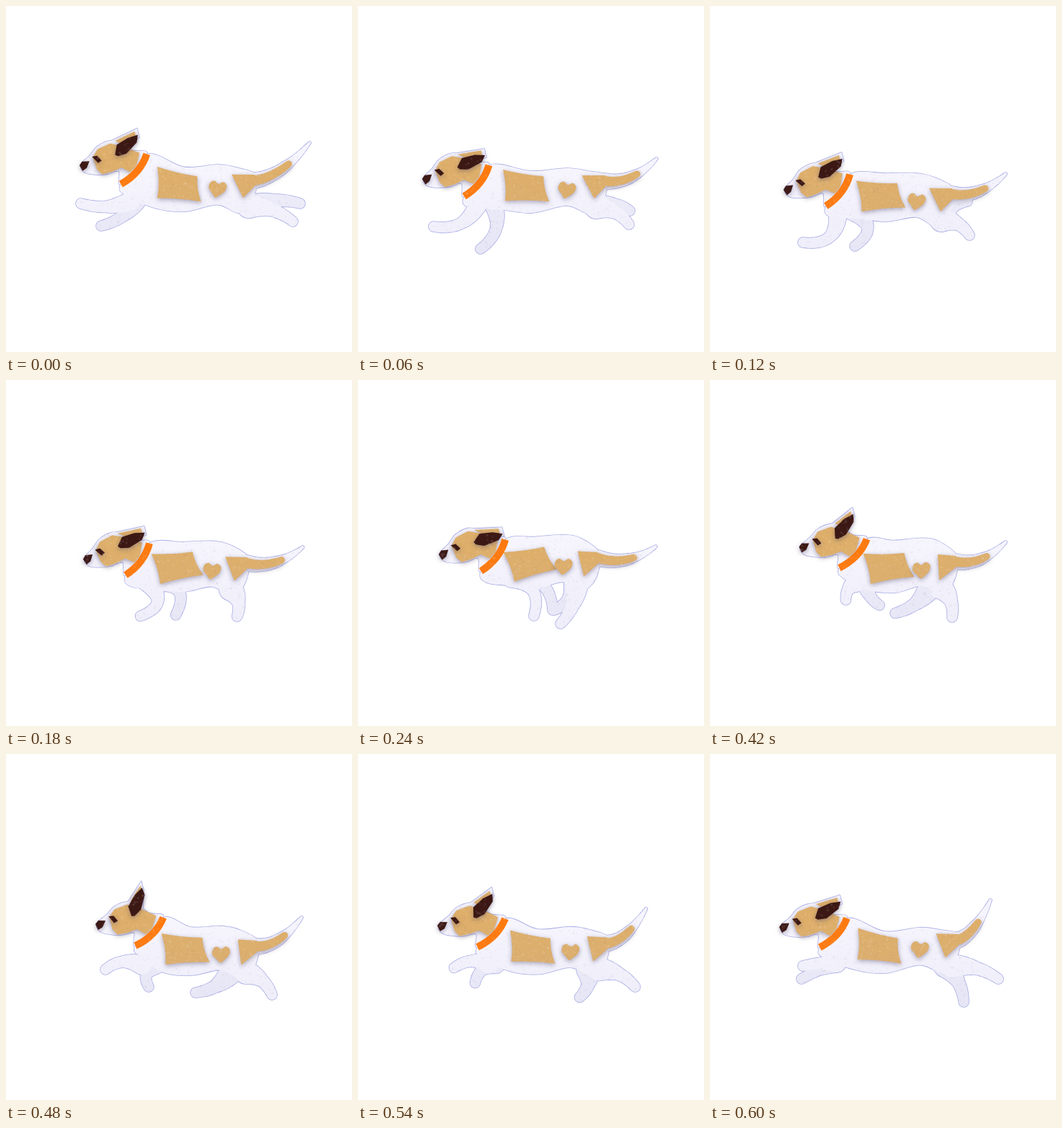
Animation of 480x480 px, one loop 0.66 s. Source, as an HTML page with a canvas:

```html
<!DOCTYPE html>
<html lang="en">
<head>
<meta charset="utf-8">
<title>Running felt dog</title>
<style>
html, body { margin: 0; width: 100%; height: 100%; overflow: hidden; background: #fff; }
canvas { display: block; width: 480px; height: 480px; }
</style>
</head>
<body>
<canvas id="stage" width="480" height="480"></canvas>
<script>
const ctx = document.getElementById('stage').getContext('2d');
const STEP = 60, STEPS = 11;
const TAN = '#deaf6a', DARK = '#3c1814', ORANGE = '#ff7a0d', WHITE = '#f6f5fd', EDGE = '#a9ade4';

// Key points of the gallop; the rest of the body follows from them.
// Paws: near front, far front, near rear, far rear.
const KEYS = [
  { at: 0, nose: [102, 222], ear: [-.72], ribs: [239, 249], hip: [321, 250], tail: [421, 190], paws: [104, 274, 132, 305, 398, 299, 408, 274] },
  { at: 1, nose: [89, 241], ear: [-.41], ribs: [232, 251], hip: [319, 251], tail: [414, 212], paws: [105, 306, 170, 337, 376, 303, 377, 284] },
  { at: 2, nose: [102, 256], ear: [-.65], ribs: [236, 263], hip: [312, 269], tail: [410, 233], paws: [129, 328, 201, 333, 360, 318, 357, 271] },
  { at: 4, nose: [112, 243], ear: [-.28], ribs: [238, 253], hip: [309, 255], tail: [413, 231], paws: [244, 327, 270, 319, 281, 338, 273, 319] },
  { at: 6, nose: [123, 228], ear: [-.64], ribs: [246, 247], hip: [310, 245], tail: [410, 223], paws: [239, 311, 272, 302, 303, 324, 251, 316] },
  { at: 8, nose: [124, 237], ear: [-1.22], ribs: [248, 271], hip: [324, 275], tail: [410, 227], paws: [138, 299, 198, 323, 369, 334, 263, 331] },
  { at: 10, nose: [96, 241], ear: [-.57], ribs: [234, 268], hip: [320, 266], tail: [389, 203], paws: [129, 294, 127, 312, 400, 312, 352, 344] }
];

// Felt pieces, measured from the nose (or from the middle of the patch)
const HEAD = [3, -4, 15, -14, 26, -26, 44, -33, 58, -29, 74, -18, 94, -12, 56, 28, 54, 10, 38, 13, 22, 13, 8, 10, 2, 3];
const MASK = [19, -11, 26, -22, 44, -29, 62, -24, 84, -14, 79, 3, 70, 12, 58, 5, 45, 10, 31, 13, 24, 6];
const EYE = [18, -12, 25, -13, 31, -6, 26, -3];
const NOSE = [0, -1, 4, -6, 14, -6, 10, 3, 4, 7];
const EAR = [0, 0, 11, -9, 29, -6, 42, 0, 34, 7, 13, 9, 2, 4];
const PATCH = [-33, -21, 24, -17, 35, 17, -26, 22];
const HEART = [0, -7, 6, -11, 12, -7, 11, 1, 6, 7, 0, 12, -6, 7, -12, 1, -11, -7, -6, -10];

const mix = (a, b, k) => a + (b - a) * k;
const mid = (a, b, k = .5) => a.map((v, i) => mix(v, b[i], k));
const add = (p, x, y) => [p[0] + x, p[1] + y];
const pairs = a => Array.from({ length: a.length / 2 }, (_, i) => [a[2 * i], a[2 * i + 1]]);

function place(list, [x, y], angle) {
  const c = Math.cos(angle), s = Math.sin(angle);
  return pairs(list).map(([u, v]) => [x + u * c - v * s, y + u * s + v * c]);
}

function poseAt(step) {
  const i = KEYS.findLastIndex(k => k.at <= step);
  const a = KEYS[i], b = KEYS[i + 1] || a, k = (step - a.at) / (b.at - a.at || 1);
  const pose = {};
  for (const key of ['nose', 'ear', 'ribs', 'hip', 'tail', 'paws']) pose[key] = mid(a[key], b[key], k);
  return pose;
}

function poly(pts) {
  const path = new Path2D();
  pts.forEach(p => path.lineTo(...p));
  path.closePath();
  return path;
}

// Closed Catmull-Rom curve
function smooth(pts) {
  const path = new Path2D(), n = pts.length, at = i => pts[(i + n) % n];
  path.moveTo(...pts[0]);
  for (let i = 0; i < n; i++) {
    const [a, b, c, d] = [at(i - 1), at(i), at(i + 1), at(i + 2)];
    path.bezierCurveTo(b[0] + (c[0] - a[0]) / 6, b[1] + (c[1] - a[1]) / 6,
      c[0] - (d[0] - b[0]) / 6, c[1] - (d[1] - b[1]) / 6, ...c);
  }
  return path;
}

// Tapered curve from a through b to c
function limb(a, b, c, radii, end = 1) {
  const path = new Path2D(), N = 40;
  const bend = mid(a, c).map((m, i) => 2 * b[i] - m);
  for (let s = 0; s <= N; s++) {
    const t = s / N * end;
    const [x, y] = mid(mid(a, bend, t), mid(bend, c, t), t);
    const r = t < .5 ? mix(radii[0], radii[1], t * 2) : mix(radii[1], radii[2], t * 2 - 1);
    path.moveTo(x + r, y);
    path.arc(x, y, r, 0, 7);
  }
  return path;
}

function leg(root, paw, fold, radii) {
  const dx = paw[0] - root[0], dy = paw[1] - root[1], len = Math.hypot(dx, dy);
  return limb(root, add(mid(root, paw), dy / len * fold, -dx / len * fold), paw, radii);
}

function felt(path, color) {
  ctx.save();
  ctx.shadowColor = 'rgba(85,75,110,.5)';
  ctx.shadowBlur = 6;
  ctx.shadowOffsetY = 2;
  ctx.fillStyle = color;
  ctx.fill(path);
  ctx.restore();
}

// Four-sided piece with slightly hollow sides
function hollow(pts) {
  const path = new Path2D(), center = mid(mid(pts[0], pts[2]), mid(pts[1], pts[3]));
  path.moveTo(...pts[0]);
  pts.forEach((p, i) => {
    const q = pts[(i + 1) % 4];
    path.quadraticCurveTo(...mid(mid(p, q), center, .14), ...q);
  });
  return path;
}

function grain(step) {
  let seed = 77 + step * 131;
  const rnd = () => (seed = (seed * 16807) % 2147483647) / 2147483647;
  ctx.save();
  ctx.globalCompositeOperation = 'source-atop';
  const shade = ctx.createLinearGradient(0, 230, 0, 345);
  shade.addColorStop(0, 'rgba(165,165,215,0)');
  shade.addColorStop(1, 'rgba(165,165,215,.1)');
  ctx.fillStyle = shade;
  ctx.fillRect(0, 0, 480, 480);
  for (let i = 0; i < 2400; i++) {
    ctx.fillStyle = i % 2 ? 'rgba(255,255,255,.1)' : 'rgba(90,60,110,.04)';
    ctx.fillRect(85 + rnd() * 345, 168 + rnd() * 185, 1 + rnd() * 2, 1 + rnd() * 2);
  }
  ctx.restore();
}

function drawDog(step) {
  const { nose, ear, ribs, hip, tail, paws } = poseAt(step);
  const phase = step / STEPS * 2 * Math.PI;
  const turn = -.05 - .07 * Math.sin(phase);
  const tilt = -.02 + .2 * Math.cos(phase + .4);
  const lean = .27 + .22 * Math.cos(phase - .57);
  const fold = 6 + 14 * Math.sin(phase);
  const arch = 22 + Math.max(0, 86 - hip[0] + ribs[0]) * .9;

  const onHead = list => place(list, nose, turn);
  const [top, low, bow, brow, earBase] = onHead([94, -12, 56, 28, 84, 14, 44, -32, 50, -13]);
  const heart = add(mid(ribs, hip, .66), 0, 4);

  const body = smooth([
    top, add(ribs, 8, -arch), add(heart, 0, -arch - 8), add(hip, 0, -arch), add(hip, 26, -16),
    add(hip, 25, 8), add(hip, 16, 28), add(hip, 0, 37), add(heart, 0, 22),
    add(ribs, 10, 36), add(ribs, -30, 32), add(low, 8, 16), low
  ]);

  const legs = pairs(paws).map((paw, i) => {
    if (i < 2) {
      const x = mix(ribs[0] - 38, paw[0], .3);
      return leg([x, ribs[1] + 22], paw, fold, [13, 8, 7]);
    }
    return leg([mix(hip[0], paw[0], .2), hip[1] + 28], paw, 6, [16, 9, 7]);
  });

  const tailRoot = add(hip, 24, -8), tailMid = add(mid(tailRoot, tail), 0, 10);
  const tailCurve = (radii, end) => limb(tailRoot, tailMid, tail, radii, end);

  const earTip = place([42, 0], earBase, ear[0])[0], far = add(earTip, -1, -9);
  const farEar = [brow, far, add(far, 3, 12), add(earBase, 16, -7)];
  const earMid = mid(mid(farEar[0], farEar[2]), mid(farEar[1], farEar[3]));

  const whites = [legs[1], legs[3], poly(farEar), tailCurve([11, 8, 2]), body, legs[0], legs[2], smooth(onHead(HEAD))];
  ctx.clearRect(0, 0, 480, 480);
  ctx.lineJoin = 'round';
  ctx.strokeStyle = EDGE;
  ctx.lineWidth = 1.6;
  whites.forEach(p => ctx.stroke(p));
  whites.forEach((p, i) => {
    ctx.fillStyle = i < 2 ? '#eeedf9' : WHITE;
    ctx.fill(p);
  });

  const dx = Math.sin(lean) * 18, dy = Math.cos(lean) * 18;
  const haunch = poly([add(hip, -dx, -dy), add(hip, 24, -16), add(hip, 24, 0), add(hip, dx, dy)]);
  haunch.addPath(tailCurve([7, 5.5, 2], .62));

  felt(poly(farEar.map(p => mid(earMid, p, .72))), TAN);
  felt(hollow(place(PATCH, ribs, tilt)), TAN);
  felt(smooth(place(HEART, heart, lean / 2)), TAN);
  felt(haunch, TAN);
  felt(poly(onHead(MASK)), TAN);
  felt(poly(onHead(EYE)), DARK);
  felt(poly(onHead(NOSE)), DARK);
  felt(poly(place(EAR, earBase, ear[0])), DARK);

  ctx.strokeStyle = ORANGE;
  ctx.lineWidth = 10;
  ctx.beginPath();
  ctx.moveTo(...top);
  ctx.quadraticCurveTo(...bow, ...low);
  ctx.stroke();
  grain(step);
}

let shown = -1;
const start = performance.now();
function tick() {
  const step = Math.floor((performance.now() - start) / STEP) % STEPS;
  if (step !== shown) drawDog(shown = step);
  requestAnimationFrame(tick);
}
tick();
</script>
</body>
</html>
```
